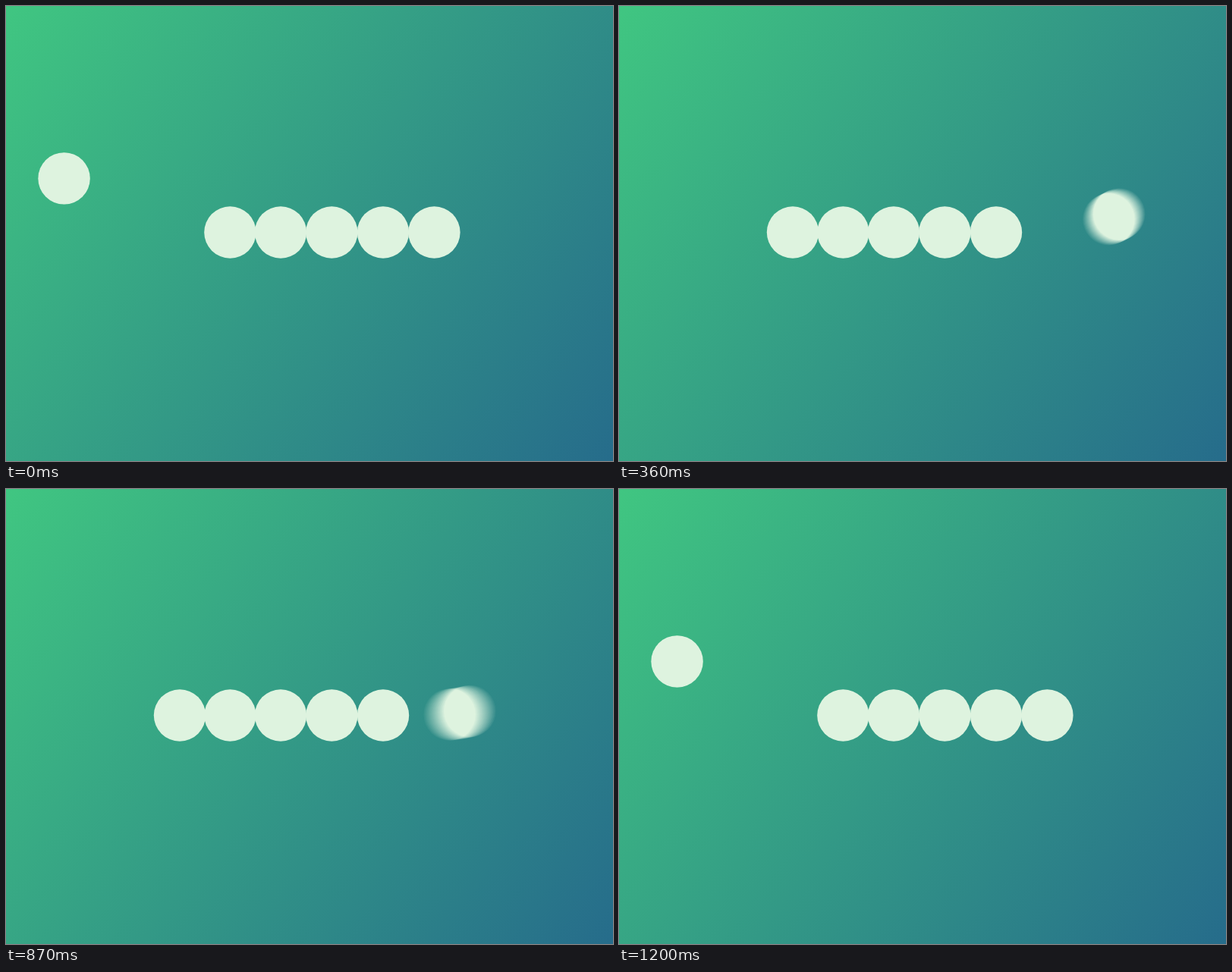
Recreate the animation shown at these times as an HTML page with a canvas. Size 800 by 600 pixels, loop 1.23 s.

```html
<!DOCTYPE html>
<html lang="en">
<head>
<meta charset="utf-8">
<title>Cradle</title>
<style>
  html, body { margin: 0; width: 100%; height: 100%; overflow: hidden; }
  canvas { display: block; }
</style>
</head>
<body>
<canvas id="stage" width="800" height="600"></canvas>
<script>
const W = 800, H = 600;
const STEP_MS = 30, STEPS = 41;
const RADIUS = 34.2, REST_Y = 298.5, ROPE = 199;
const LEFT_X = 229, RIGHT_X = 564.4, INNER_X = [295.4, 362, 429.3, 497];
const MAX_ANGLE = 50 * Math.PI / 180;
const HALF_SWING = 9.75;           // steps from the top to the bottom
const SHUTTER = 0.42, SAMPLES = 15; // motion blur
const BALL = '#def3df';

const ctx = document.getElementById('stage').getContext('2d');
const layer = document.createElement('canvas');
layer.width = W;
layer.height = H;
const blur = layer.getContext('2d');

const sky = ctx.createLinearGradient(0, 0, W, H);
sky.addColorStop(0, '#40c681');
sky.addColorStop(1, '#266c8b');

// y of cubic-bezier(.75, 0, .25, 1) at x
function ease(x) {
  let lo = 0, hi = 1;
  for (let i = 0; i < 30; i++) {
    const u = (lo + hi) / 2, v = 1 - u;
    if (2.25 * v * v * u + 0.75 * v * u * u + u * u * u < x) lo = u; else hi = u;
  }
  return lo * lo * (3 - 2 * lo);
}

// Angle for a ball that many steps away from its highest point
function angle(fromTop) {
  const d = Math.min(Math.max(fromTop, 0), HALF_SWING);
  return MAX_ANGLE * (1 - 2 * ease(d / (2 * HALF_SWING)));
}

const leftAngle = s => -angle(s < 20 ? s - 0.15 : 40.15 - s);
const rightAngle = s => angle(s < 20 ? 20.1 - s : s - 19.75);

function disc(c, x, y) {
  c.beginPath();
  c.arc(x, y, RADIUS, 0, Math.PI * 2);
  c.fill();
}

function swing(step, pivotX, angleAt) {
  blur.globalCompositeOperation = 'source-over';
  blur.clearRect(0, 0, W, H);
  blur.globalCompositeOperation = 'lighter';
  blur.globalAlpha = 1 / SAMPLES;
  blur.fillStyle = '#fff';
  for (let i = 0; i < SAMPLES; i++) {
    const a = angleAt(step + SHUTTER * (i / (SAMPLES - 1) - 0.5));
    disc(blur, pivotX + ROPE * Math.sin(a), REST_Y - ROPE * (1 - Math.cos(a)));
  }
  blur.globalAlpha = 1;
  blur.globalCompositeOperation = 'source-in';
  blur.fillStyle = BALL;
  blur.fillRect(0, 0, W, H);
  ctx.drawImage(layer, 0, 0);
}

function place(step, x, angleAt) {
  const resting = [-0.5, 0.5].every(o => Math.abs(angleAt(step + o * SHUTTER)) < 1e-6);
  if (resting) disc(ctx, x, REST_Y);
  else swing(step, x, angleAt);
}

function draw(step) {
  ctx.fillStyle = sky;
  ctx.fillRect(0, 0, W, H);
  ctx.fillStyle = BALL;
  for (const x of INNER_X) disc(ctx, x, REST_Y);
  place(step, LEFT_X, leftAngle);
  place(step, RIGHT_X, rightAngle);
}

let start;
function tick(now) {
  start ??= now;
  draw(Math.floor((now - start) / STEP_MS) % STEPS);
  requestAnimationFrame(tick);
}
draw(0);
requestAnimationFrame(tick);
</script>
</body>
</html>
```
